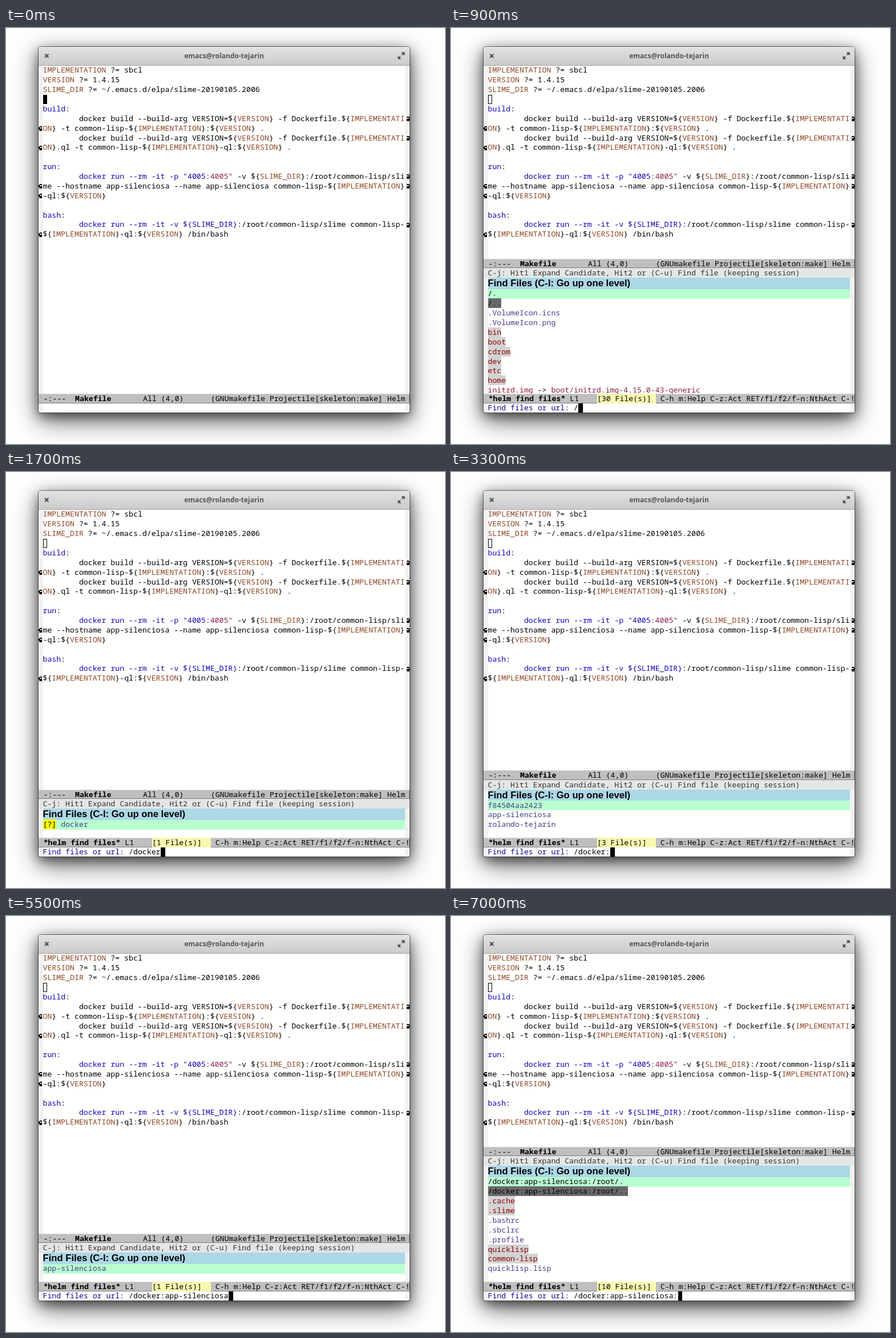
Recreate the animation shown at these times as an HTML page. Size 769x728 px, loop 8000 ms.

```html
<!DOCTYPE html>
<html lang="en">
<head>
<meta charset="utf-8">
<title>Helm over TRAMP</title>
<style>
html, body { margin: 0; width: 100%; height: 100%; overflow: hidden; background: #fefefe; }
#win {
  position: absolute; left: 57px; top: 33px; width: 650px; height: 640px;
  overflow: hidden; border-radius: 4px 4px 3px 3px; background: #f2f2f2;
  box-shadow: 0 0 0 1px rgba(0,0,0,.5), 0 14px 44px rgba(0,0,0,.6), 0 6px 20px rgba(0,0,0,.5);
  font: 13.215px/16.88px "Roboto Mono", "Noto Sans Mono", "Liberation Mono", monospace;
  color: #000; font-variant-ligatures: none; white-space: pre;
}
#win div, #win svg { position: absolute; }
#bar {
  left: 0; top: 0; width: 650px; height: 32px; border-bottom: 1px solid #a3a3a3;
  background: linear-gradient(#e2e2e2, #cbcbcb); box-shadow: inset 0 1px #f0f0f0;
  text-align: center; font: bold 12px/32px "Open Sans", sans-serif; color: #555;
}
#page { left: 7.5px; top: 33px; width: 634.5px; height: 607px; background: #fffffe; }
#code { left: 0; top: 0; }
.row { left: 7.5px; height: 16.88px; }
.row > span { position: relative; top: -.6px; }
.mode {
  left: 0; width: 650px; height: 16.88px; background: #bfbfbf; overflow: hidden;
  box-shadow: inset 0 1px #d2d2d2, inset -1px -1px #7c7c7c; text-indent: .7px;
}
.head { left: 0; top: 0; width: 650px; height: 17px; background: #e5e5e5; color: #333; text-indent: 7.5px; }
.title {
  left: 7.5px; width: 634.5px; height: 19.7px; background: #add8e6;
  font: bold 16.65px/20px "Liberation Sans", Arial, sans-serif;
}
.sel { width: 634.5px; background: #b8ffd0; }
#win i { font-style: normal; }
.v { color: #8b4728; }
.f { color: #1408b0; }
.s { color: #8b2252; }
.file { color: #483d8b; }
.link { color: #a01c2c; }
.dir, .dots, .ask, .count { display: inline-block; height: 16.88px; vertical-align: top; text-indent: 0; }
.dir { color: #8b0000; background: #d3d3d3; }
.dots { background: #696969; }
.ask { background: #ff0; }
.count { background: #f8f8b0; }
#helm { left: 0; width: 650px; overflow: hidden; background: #f2f2f2; }
#helm .body { left: 7.5px; top: 0; width: 634.5px; height: 100%; background: #fffffe; }
#mini { left: 7.5px; top: 623.8px; width: 634.5px; height: 17px; background: #fffffe; }
.cur { width: 7.93px; height: 16.4px; background: #000; box-sizing: border-box; }
.cur.hollow { background: none; border: 1px solid #000; }
.prompt { color: #100898; }
</style>
</head>
<body>
<div id="win">
  <div id="bar">emacs@rolando-tejarin
    <svg style="left:0;top:0" width="650" height="32" fill="none" stroke="#484848" stroke-width="1.8">
      <path d="M11 12.5l6.5 6.5M17.5 12.5l-6.5 6.5"/>
      <path d="M636 14.5l4-4M634 16.5l-4 4" stroke-width="1.6"/>
      <path d="M635.5 9.5h6v6zM629.5 15.5v6h6z" fill="#484848" stroke="none"/>
    </svg>
  </div>
  <div id="page"></div>
  <div id="code"></div>
  <div id="point" class="cur"></div>
  <div id="main" class="mode"></div>
  <div id="helm"></div>
  <div id="status" class="mode"></div>
  <div id="mini"></div>
  <div id="input" class="row"></div>
  <div id="caret" class="cur"></div>
</div>
<script>
const LOOP = 8000, ROW = 16.88, COL = 7.929, TOP = 33, LEFT = 7.5;
const APP = "app-silenciosa", ROOT = `/docker:${APP}:/root/`;
const $ = id => document.getElementById(id);
const y = row => TOP + row * ROW;
const tag = (cls, text) => `<i class="${cls}">${text}</i>`;
const name = text => tag("v", text);
const ref = text => "${" + name(text) + "}";
const line = (top, html, cls = "") => `<div class="row ${cls}" style="top:${top}px"><span>${html}</span></div>`;

const TAB = " ".repeat(8);
const build = TAB + "docker build --build-arg VERSION=" + ref("VERSION") +
  " -f Dockerfile.${" + name("IMPLEMENTATI");
const makefile = [
  name("IMPLEMENTATION") + " ?= sbcl",
  name("VERSION") + " ?= 1.4.15",
  name("SLIME_DIR") + " ?= ~/.emacs.d/elpa/slime-20190105.2006",
  "",
  tag("f", "build") + ":",
  build,
  name("ON") + "} -t common-lisp-" + ref("IMPLEMENTATION") + ":" + ref("VERSION") + " .",
  build,
  name("ON") + "}.ql -t common-lisp-" + ref("IMPLEMENTATION") + "-ql:" + ref("VERSION") + " .",
  "",
  tag("f", "run") + ":",
  TAB + tag("f", 'docker run --rm -it -p "4005') + tag("s", ':4005"') + " -v " + ref("SLIME_DIR") + ":/root/common-lisp/sli",
  `me --hostname ${APP} --name ${APP} common-lisp-` + ref("IMPLEMENTATION"),
  "-ql:" + ref("VERSION"),
  "",
  tag("f", "bash") + ":",
  TAB + tag("f", "docker run --rm -it -v ${SLIME_DIR}") + ":/root/common-lisp/slime common-lisp-",
  ref("IMPLEMENTATION") + "-ql:" + ref("VERSION") + " /bin/bash"
];

// Fringe arrows for wrapped lines; the right one is the left one mirrored.
const arrow = (row, right) =>
  `<svg width="8" height="8" style="left:${right ? 642.5 : 0}px;top:${y(row) + 4.7}px">` +
  `<path ${right ? 'transform="translate(8)scale(-1,1)"' : ""} d="M2 0H6V2H2V3H3V4H5V3H6V8H1V7H2V6H1V5H0V2H1V1H2Z"/></svg>`;

$("code").innerHTML = makefile.map((text, i) => line(y(i), text)).join("") +
  [5, 7, 11, 12, 16].map(i => arrow(i, true) + arrow(i + 1, false)).join("");
$("main").innerHTML = " -:---  <b>Makefile</b>       All (4,0)      (GNUmakefile Projectile[skeleton:make] Helm";
$("point").style.cssText = `left:${LEFT}px;top:${y(3)}px`;

const file = text => tag("file", text);
const dir = text => tag("dir", text);
const ask = text => tag("ask", "[?]") + " " + file(text);
const home = path => [path + ".", tag("dots", path + "..")];

const here = [...home("~/common-lisp/"), ...["Dockerfile.sbcl", "Dockerfile.sbcl.ql", "Makefile"].map(file)];
const slash = [
  ...home("/"), file(".VolumeIcon.icns"), file(".VolumeIcon.png"),
  ...["bin", "boot", "cdrom", "dev", "etc", "home"].map(dir),
  tag("link", "initrd.img") + " -> " + tag("s", "boot/initrd.img-4.15.0-43-generic")
];
const hosts = ["f84504aa2423", APP, "rolando-tejarin"].map(file);
const one = [file(APP)];
const remote = [
  ...home(ROOT), dir(".cache"), dir(".slime"), file(".bashrc"), file(".sbclrc"), file(".profile"),
  dir("quicklisp"), dir("common-lisp"), file("quicklisp.lisp")
];

// Each step: start time, typed path, candidates, and the count when it exceeds the list.
const steps = [
  [0, null],
  [500, "~/common-lisp/", here],
  [900, "/", slash, 30],
  [1200, "/d", [ask("d"), dir("dev"), dir("cdrom")]],
  [1300, "/do", [ask("do"), dir("cdrom")]]
];
for (let n = 3; n <= 6; n++) {
  const word = "docker".slice(0, n);
  steps.push([1100 + n * 100, "/" + word, [ask(word)]]);
}
steps.push([3300, "/docker:", hosts], [3500, "/docker:a", hosts]);
[[3700, 3], [4000, 4], [4100, 5], [4300, 6], [4400, 7], [4600, 8], [4700, 9],
 [5000, 11], [5300, 12], [5400, 13], [5500, 14]]
  .forEach(([at, n]) => steps.push([at, "/docker:" + APP.slice(0, n), one]));
steps.push([6900, `/docker:${APP}:`, one], [7000, `/docker:${APP}:`, remote]);

const PROMPT = "Find files or url: ";

function show([, path, list, total]) {
  const open = path !== null;
  const top = open ? Math.max(20, 30 - list.length) : 34;
  $("main").style.top = y(top) + "px";
  $("point").className = open ? "cur hollow" : "cur";
  for (const id of ["helm", "status", "input", "caret"]) $(id).style.display = open ? "" : "none";
  if (!open) return;

  const helm = $("helm");
  helm.style.top = y(top + 1) + "px";
  helm.style.height = (33 - top) * ROW + "px";
  helm.innerHTML = '<div class="body"></div>' +
    '<div class="head">C-j: Hit1 Expand Candidate, Hit2 or (C-u) Find file (keeping session)</div>' +
    `<div class="title" style="top:${ROW}px">Find Files (C-l: Go up one level)</div>` +
    list.map((text, i) => line(36.5 + i * ROW, text, i ? "" : "sel")).join("");

  const count = `[${total || list.length} File(s)]`.padEnd(13);
  $("status").style.top = y(34) + "px";
  $("status").innerHTML = " <b>*helm find files*</b> L1    " + tag("count", count) +
    " C-h m:Help C-z:Act RET/f1/f2/f-n:NthAct C-!";
  $("input").style.top = y(35) + "px";
  $("input").innerHTML = `<span>${tag("prompt", PROMPT)}${path}</span>`;
  $("caret").style.left = LEFT + (PROMPT.length + path.length) * COL + "px";
  $("caret").style.top = y(35) + "px";
}

let shown = null;
function tick() {
  const t = performance.now() % LOOP;
  const step = steps.findLast(s => s[0] <= t);
  if (step !== shown) show(shown = step);
  requestAnimationFrame(tick);
}
tick();
</script>
</body>
</html>
```
